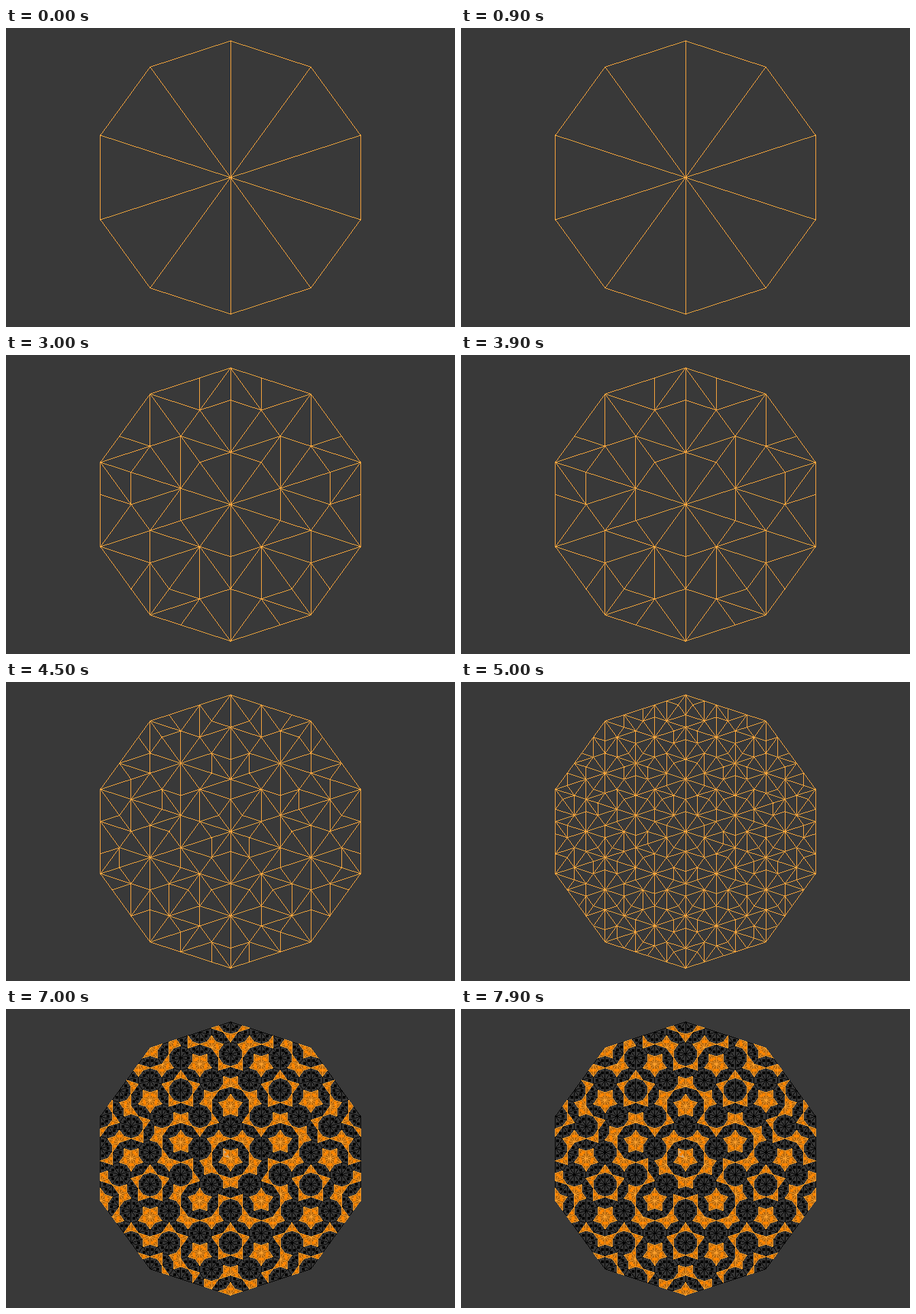
Write an HTML page with a canvas that moves like this. It is 660 px wide and 440 px high and loops after 8.5 s.

```html
<!DOCTYPE html>
<html lang="en">
<head>
<meta charset="utf-8">
<title>Kite and dart subdivision</title>
<style>
html, body { margin: 0; width: 100%; height: 100%; overflow: hidden; background: #393939; }
canvas { display: block; }
</style>
</head>
<body>
<canvas width="660" height="440"></canvas>
<script>
const ctx = document.querySelector('canvas').getContext('2d');
// The small offset keeps the centre spokes on one side of the pixel border.
const CENTER = [330.01, 220.01], RADIUS = 201;
const LOOP = 8500, STARTS = [0, 1500, 3000, 4500, 5000, 5500, 7000];
const DEPTH = 5;
const LONG = (Math.sqrt(5) - 1) / 2, SHORT = 1 - LONG;

const mix = (a, b, t) => [a[0] + (b[0] - a[0]) * t, a[1] + (b[1] - a[1]) * t];
const kite = (apex, wing, tip) => ({ dart: false, pts: [apex, wing, tip] });
const dart = (tip, wing, notch) => ({ dart: true, pts: [tip, wing, notch] });

function spoke(i) {
  const a = i * Math.PI / 5;
  return [CENTER[0] + RADIUS * Math.sin(a), CENTER[1] - RADIUS * Math.cos(a)];
}

// Half kites and half darts split by the golden ratio.
function split(half) {
  const [a, b, c] = half.pts;
  if (half.dart) {
    const r = mix(a, b, LONG);
    return [kite(a, r, c), dart(b, c, r)];
  }
  const q = mix(a, b, SHORT), p = mix(a, c, LONG);
  return [kite(b, q, p), kite(b, c, p), dart(a, p, q)];
}

const levels = [[]];
for (let i = 0; i < 10; i++) {
  const odd = i % 2;
  levels[0].push(kite(CENTER, spoke(i + odd), spoke(i + 1 - odd)));
}
for (let i = 0; i < DEPTH; i++) levels.push(levels[i].flatMap(split));

// One-pixel line without smoothing, sampled at pixel centres of its longer axis.
function line(a, b) {
  const major = Math.abs(b[1] - a[1]) > Math.abs(b[0] - a[0]) ? 1 : 0;
  const minor = 1 - major;
  if (a[major] > b[major]) [a, b] = [b, a];
  const slope = (b[minor] - a[minor]) / (b[major] - a[major]);
  for (let u = Math.floor(a[major]); u <= b[major]; u++) {
    const v = Math.floor(a[minor] + slope * (u + 0.5 - a[major]));
    if (major) ctx.fillRect(v, u, 1, 1);
    else ctx.fillRect(u, v, 1, 1);
  }
}

function wire(halves, color) {
  ctx.fillStyle = color;
  for (const { pts } of halves) pts.forEach((p, i) => line(p, pts[(i + 1) % 3]));
}

const centroid = pts => [0, 1].map(k => (pts[0][k] + pts[1][k] + pts[2][k]) / 3);

function faces(halves, color) {
  ctx.fillStyle = color;
  ctx.beginPath();
  for (const { pts } of halves) {
    pts.forEach(([x, y], i) => ctx[i ? 'lineTo' : 'moveTo'](x, y));
    ctx.closePath();
  }
  ctx.fill();
}

function dots(halves, color) {
  ctx.fillStyle = color;
  for (const { pts } of halves) {
    const [x, y] = centroid(pts);
    ctx.fillRect(Math.round(x) - 2, Math.round(y) - 2, 4, 4);
  }
}

function drawSelection(halves) {
  const kites = halves.filter(h => !h.dart), darts = halves.filter(h => h.dart);
  const active = darts.filter(h => {
    const [x, y] = centroid(h.pts);
    return Math.hypot(x - 322, y - 214) < 3;
  });
  faces(kites, '#363636');
  faces(darts, '#b5680f');
  faces(active, '#c9a67c');
  wire(kites, '#000');
  wire(darts, '#ffa02a');
  dots(kites, '#000');
  dots(darts, '#ff8500');
}

function draw(stage) {
  ctx.fillStyle = '#393939';
  ctx.fillRect(0, 0, 660, 440);
  if (stage > DEPTH) drawSelection(levels[DEPTH]);
  else wire(levels[stage], '#ffa83c');
}

let shown = -1;
const begin = performance.now();
function tick() {
  const t = (performance.now() - begin) % LOOP;
  const stage = STARTS.filter(s => s <= t).length - 1;
  if (stage !== shown) draw(shown = stage);
  requestAnimationFrame(tick);
}
tick();
</script>
</body>
</html>
```
